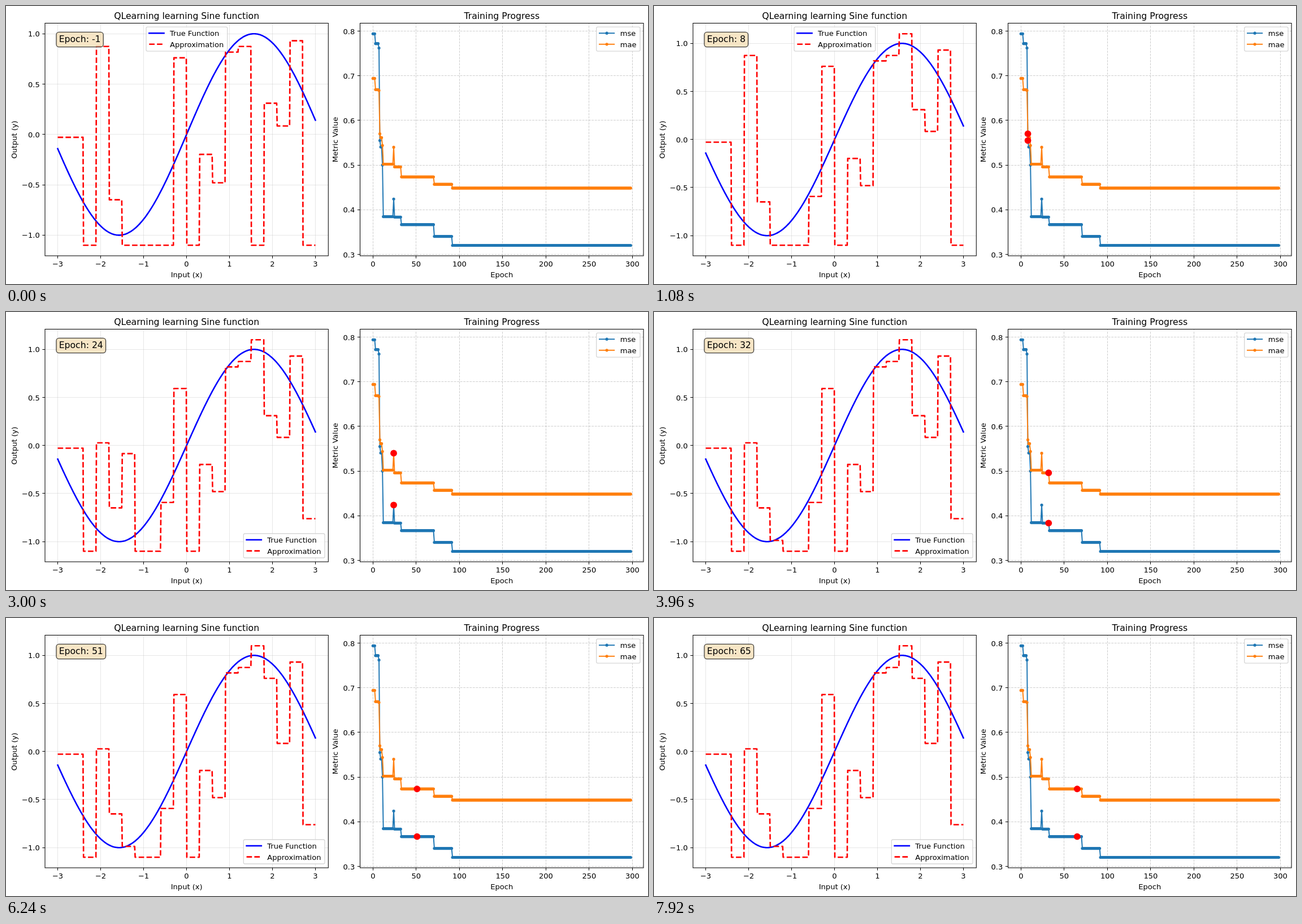
These frames come from a looping animation (1136x493 px, 8 s). An HTML page with a canvas:

```html
<!DOCTYPE html>
<html lang="en">
<head>
<meta charset="utf-8">
<title>Learning a sine function</title>
<style>
html, body { margin: 0; width: 100%; height: 100%; overflow: hidden; background: #fff; }
canvas { display: block; }
</style>
</head>
<body>
<canvas id="stage" width="1136" height="493"></canvas>
<script>
const ctx = document.getElementById('stage').getContext('2d');
const LOOP = 8000, STEP = 120;
const PT = 1.306; // pixels per point
const SMALL = 10 * PT, LARGE = 12 * PT;
const MSE = '#1f77b4', MAE = '#ff7f0e';
const TOP = 30.5, BOTTOM = 443;
const LEFT_AXES = [69, 570.3], RIGHT_AXES = [626.5, 1128];

// Quantised output of each bin (0..39 spans -1.1..1.1)
const startLevels = [19, 19, 0, 35, 8, 0, 0, 0, 0, 33, 0, 16, 11, 34, 35, 0, 25, 21, 36, 0];
// [epoch, bin, new level]
const updates = [[3, 8, 9], [7, 15, 1], [8, 15, 39], [9, 9, 30], [11, 19, 6],
  [12, 3, 20], [24, 5, 18], [25, 5, 2], [33, 16, 33]];
// [first epoch, mse, mae]
const metrics = [[0, .794, .694], [3, .772, .669], [7, .762, .667], [8, .555, .57],
  [9, .5405, .5615], [11, .5, .544], [12, .3845, .502], [24, .424, .54], [25, .3835, .496],
  [33, .3667, .4735], [71, .3403, .457], [92, .3202, .4485]];
const metricAt = (epoch, column) => metrics.findLast(row => row[0] <= epoch)[column];

const SAMPLES = 500;
const inputs = Array.from({ length: SAMPLES }, (_, i) => -3 + 6 * i / (SAMPLES - 1));

const snap = v => Math.round(v - .5) + .5;
const epochX = e => 649.3 + e * 1.5303;
const metricY = v => 44.5 + (.8 - v) * 792;
const inputX = x => 319.5 + x * 76;

function line(points, color, width, dash = [], cap = 'butt') {
  ctx.beginPath();
  points.forEach(([x, y]) => ctx.lineTo(x, y));
  ctx.strokeStyle = color;
  ctx.lineWidth = width * PT;
  ctx.lineCap = cap;
  ctx.lineJoin = 'round';
  ctx.setLineDash(dash.map(d => d * width * PT));
  ctx.stroke();
}

function dot(x, y, r, color) {
  ctx.beginPath();
  ctx.arc(x, y, r, 0, 2 * Math.PI);
  ctx.fillStyle = color;
  ctx.fill();
}

function text(str, x, y, size = SMALL, align = 'center', angle = 0) {
  ctx.save();
  ctx.translate(x, y);
  ctx.rotate(angle);
  ctx.font = `${size}px "DejaVu Sans", sans-serif`;
  ctx.textAlign = align;
  ctx.fillStyle = '#000';
  ctx.fillText(str, 0, 0);
  ctx.restore();
}

function roundBox(x, y, w, h, r, fill, edge) {
  ctx.beginPath();
  ctx.roundRect(x, y, w, h, r);
  ctx.fillStyle = fill;
  ctx.fill();
  ctx.strokeStyle = edge;
  ctx.lineWidth = PT;
  ctx.setLineDash([]);
  ctx.stroke();
}

function axes([left, right], xTicks, yTicks, gridColor, dash, labels) {
  const [title, xLabel, yLabel, yLabelX] = labels;
  for (const [x, label] of xTicks) {
    const sx = snap(x);
    line([[sx, BOTTOM], [sx, TOP]], gridColor, .8, dash);
    line([[sx, BOTTOM], [sx, BOTTOM + 4.6]], '#000', .8);
    text(label, x, 462);
  }
  for (const [y, label] of yTicks) {
    const sy = snap(y);
    line([[left, sy], [right, sy]], gridColor, .8, dash);
    line([[left, sy], [left - 4.6, sy]], '#000', .8);
    text(label, left - 9.2, y + 5, SMALL, 'right');
  }
  const middle = (left + right) / 2;
  text(title, middle, 22.5, LARGE);
  text(xLabel, middle, 481);
  text(yLabel, yLabelX, 237, SMALL, 'center', -Math.PI / 2);
}

function frame([left, right]) {
  ctx.setLineDash([]);
  ctx.lineWidth = .8 * PT;
  ctx.lineJoin = 'miter';
  ctx.strokeStyle = '#000';
  ctx.strokeRect(left, TOP, right - left, BOTTOM - TOP);
}

// entries: [label, color, width, dash, has marker]
function legend(x, y, width, entries) {
  roundBox(x, y, width, 43, 2.6, 'rgba(255,255,255,.8)', 'rgba(204,204,204,.8)');
  entries.forEach(([label, color, lineWidth, dash, marker], i) => {
    const rowY = y + 11 + i * 19.6;
    line([[x + 5.3, rowY], [x + 31.5, rowY]], color, lineWidth, dash, dash ? 'butt' : 'square');
    if (marker) dot(x + 18.4, rowY, 2.6, color);
    text(label, x + 42, rowY + 5, SMALL, 'left');
  });
}

function drawFunctions(epoch) {
  const levels = [...startLevels];
  for (const [at, bin, level] of updates) if (at <= epoch) levels[bin] = level;
  const max = levels.includes(39) ? 1.21 : 1.105;
  const min = max === 1.21 ? -1.21 : -1.205;
  const outputY = v => TOP + (max - v) * (BOTTOM - TOP) / (max - min);
  const tickName = (v, digits) => v.toFixed(digits).replace('-', '−');
  const approximate = x => -1.1 + levels[Math.min(19, Math.floor((x + 3) / .3))] * 2.2 / 39;
  const curve = f => inputs.map(x => [inputX(x), outputY(f(x))]);

  axes(LEFT_AXES,
    [-3, -2, -1, 0, 1, 2, 3].map(v => [inputX(v), tickName(v, 0)]),
    [-1, -.5, 0, .5, 1].map(v => [outputY(v), tickName(v, 1)]),
    'rgba(176,176,176,.3)', [],
    ['QLearning learning Sine function', 'Input (x)', 'Output (y)', 19]);

  line(curve(Math.sin), '#00f', 2, [], 'square');
  line(curve(approximate), '#f00', 2, [3.7, 1.6]);
  frame(LEFT_AXES);

  const label = `Epoch: ${epoch}`;
  ctx.font = `${LARGE}px "DejaVu Sans", sans-serif`;
  roundBox(89, 46.3, ctx.measureText(label).width + 9.4, 26.4, 4.7,
    'rgba(245,222,179,.75)', 'rgba(0,0,0,.75)');
  text(label, 93.7, 64, LARGE, 'left');

  const [legendX, legendY] = levels[19] ? [420.3, 393] : [248, 37.2];
  legend(legendX, legendY, 143.7, [
    ['True Function', '#00f', 2],
    ['Approximation', '#f00', 2, [3.7, 1.6]]]);
}

function drawMetrics(epoch) {
  axes(RIGHT_AXES,
    [0, 50, 100, 150, 200, 250, 300].map(e => [epochX(e), e]),
    [.3, .4, .5, .6, .7, .8].map(v => [metricY(v), v.toFixed(1)]),
    'rgba(176,176,176,.6)', [3.7, 1.6],
    ['Training Progress', 'Epoch', 'Metric Value', 587]);

  [MSE, MAE].forEach((color, i) => {
    const points = Array.from({ length: 299 }, (_, e) => [epochX(e), metricY(metricAt(e, i + 1))]);
    line(points, color, 1.5, [], 'square');
    points.forEach(([x, y]) => dot(x, y, 2.6, color));
  });
  if (epoch >= 0) {
    for (const column of [1, 2]) dot(epochX(epoch), metricY(metricAt(epoch, column)), 5.9, '#f00');
  }
  frame(RIGHT_AXES);
  legend(1044.7, 37.2, 77.3, [
    ['mse', MSE, 1.5, undefined, true],
    ['mae', MAE, 1.5, undefined, true]]);
}

let shown;
function tick() {
  const epoch = Math.floor(performance.now() % LOOP / STEP) - 1;
  if (epoch !== shown) {
    shown = epoch;
    ctx.fillStyle = '#fff';
    ctx.fillRect(0, 0, 1136, 493);
    drawFunctions(epoch);
    drawMetrics(epoch);
  }
  requestAnimationFrame(tick);
}
tick();
</script>
</body>
</html>
```
